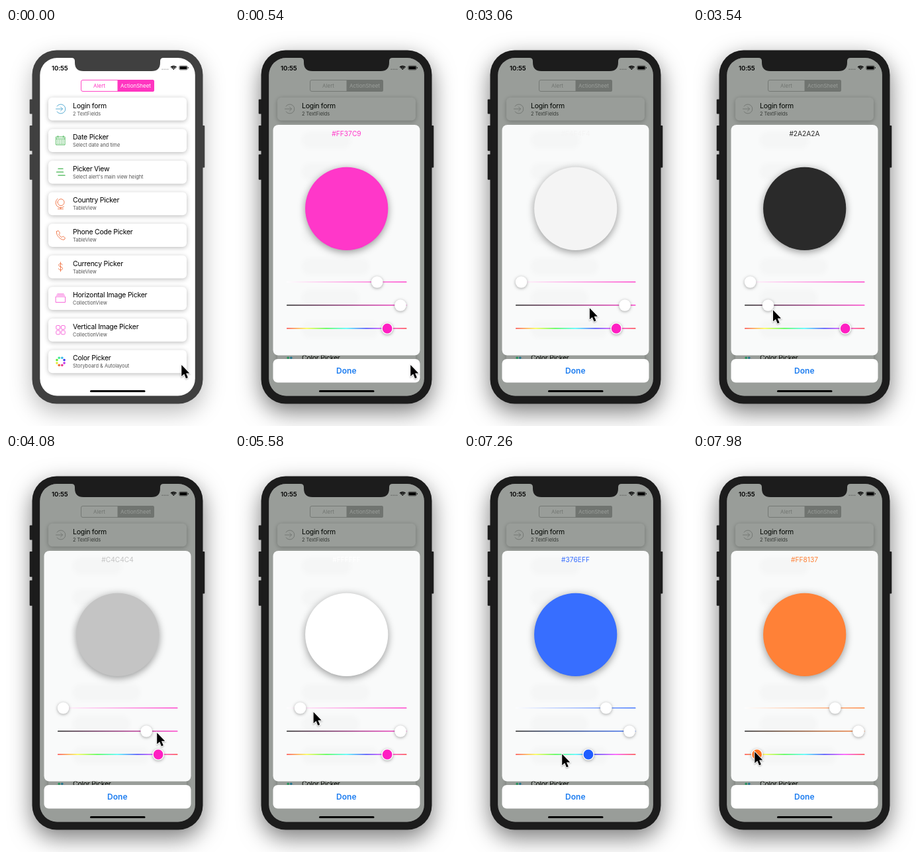
Write an HTML page with a canvas that moves like this. It is 337 px wide and 600 px high and loops after 8000 ms.

```html
<!DOCTYPE html>
<html lang="en">
<head>
<meta charset="utf-8">
<title>Color picker sheet</title>
<style>
  html, body { margin: 0; width: 100%; height: 100%; overflow: hidden; background: #fff; }
  canvas { display: block; width: 100vw; height: 100vh; }
</style>
</head>
<body>
<canvas></canvas>
<script>
const W = 337, H = 600, LOOP = 8000, TICK = 60;
const canvas = document.querySelector('canvas');
const ctx = canvas.getContext('2d');
const FONT = 'Inter, Roboto, sans-serif';
const PINK = '#ff35c0', BLUE = '#4aa5d0', GREEN = '#45b552', ORANGE = '#f07040', MAGENTA = '#f658d6';

// Moves: [start, end, ...destination], each easing on from the last position
const CURSOR = [
  [780, 1140, 223.5, 388],
  [1470, 2070, 51, 374],
  [2220, 2760, 265, 418],
  [2880, 3448, 106, 425],
  [3480, 4460, 254, 418],
  [4560, 5400, 88, 382],
  [5520, 5940, 222, 409],
  [6000, 6360, 222, 452],
  [6420, 6780, 231, 456],
  [6930, 7730, 92.5, 448]
];
const FULL = .7843, MAGENTA_HUE = .8785;
const SAT = [[1600, 2055, 0], [5550, 6050, FULL]];
const VAL = [[3044, 3540, .165], [3540, 4590, 1]];
const HUE = [[7075, 7980, .0617]];

const clamp = v => Math.max(0, Math.min(1, v));
const ease = (t, t0, t1) => Math.sin(clamp((t - t0) / (t1 - t0)) * Math.PI / 2);
const follow = (from, moves, t) => moves.reduce(
  (pos, [t0, t1, ...to]) => pos.map((p, i) => p + (to[i] - p) * ease(t, t0, t1)), from);

const rgb = c => `rgb(${c.map(Math.round).join(',')})`;
const hex = c => '#' + c.map(v => Math.round(v).toString(16).padStart(2, '0')).join('').toUpperCase();

function hsv(h, s, v) {
  return [5, 3, 1].map(n => {
    const k = (n + h * 6) % 6;
    return 255 * v * (1 - s * Math.max(0, Math.min(k, 4 - k, 1)));
  });
}
const vivid = h => hsv(h, .88, 1);

function shadow(alpha, blur, dy, paint) {
  const scale = ctx.getTransform().a;
  ctx.save();
  ctx.shadowColor = `rgba(0,0,0,${alpha})`;
  ctx.shadowBlur = blur * scale;
  ctx.shadowOffsetY = dy * scale;
  paint();
  ctx.restore();
}

function box(x, y, w, h, r, fill) {
  ctx.beginPath();
  ctx.roundRect(x, y, w, h, r);
  if (fill) { ctx.fillStyle = fill; ctx.fill(); }
}

function disc(x, y, r, fill) {
  ctx.beginPath();
  ctx.arc(x, y, r, 0, 7);
  ctx.fillStyle = fill;
  ctx.fill();
}

function text(str, x, y, size, fill, align = 'left', weight = 400, spacing = 0) {
  ctx.font = `${weight} ${size}px ${FONT}`;
  ctx.letterSpacing = spacing + 'px';
  ctx.textAlign = align;
  ctx.fillStyle = fill;
  ctx.fillText(str, x, y);
}

function line(color, path, width = .9) {
  ctx.strokeStyle = color;
  ctx.lineWidth = width;
  ctx.lineCap = ctx.lineJoin = 'round';
  ctx.stroke(new Path2D(path));
}

// Icons are drawn around their centre
const ICONS = {
  login(c) { line(c, 'M-5.5 -4A7 7 0 1 1 -5.5 4M-7 0H3M0 -3L3 0L0 3'); },
  calendar(c) {
    line(c, 'M-6.5 -5.5H6.5V6.5H-6.5ZM-6.5 -2.5H6.5M-4 -7V-4.5M4 -7V-4.5');
    for (let i = 0; i < 12; i++) {
      ctx.fillStyle = c;
      ctx.fillRect(-4.8 + i % 4 * 2.6, -.9 + Math.floor(i / 4) * 2.4, 1.4, 1.2);
    }
  },
  rows(c) { line(c, 'M-3.5 -5H3.5M-6 0H4M-3.5 5H6.5', 1.3); },
  globe(c) {
    line(c, 'M-4.5 -2A5 5 0 1 0 5.5 -2A5 5 0 1 0 -4.5 -2M-4.5 -7.5A7.3 7.3 0 0 0 5 4.5M0 5.5V8M-4 8H4');
  },
  phone(c) {
    line(c, 'M-6 -5.5L-3.5 -7L-1 -3.2L-2.7 -1.3C-1.5 1 0 2.3 1.8 3.2L3.6 1.5L7 4.2L5.5 6.7C1 8 -7.5 .5 -6 -5.5Z');
  },
  dollar(c) { line(c, 'M2.8 -3C2 -5.5 -3 -5.3 -2.8 -2.5C-2.6 .4 3 -.5 3 2.6C3 5.5 -2.5 5.6 -3 2.8M0 -7V7'); },
  stack(c) { line(c, 'M-7 -2.5H7V6H-7ZM-6 -4.7H6M-4.7 -6.7H4.7'); },
  grid(c) {
    ctx.strokeStyle = c;
    ctx.lineWidth = .9;
    for (const x of [-6.7, .9]) for (const y of [-6.7, .9]) { box(x, y, 5.8, 5.8, 1.5); ctx.stroke(); }
  },
  dots() {
    for (let i = 0; i < 8; i++) {
      const a = (i - 2.5) * Math.PI / 4;
      disc(6 * Math.cos(a), 6 * Math.sin(a), 1.8, rgb(hsv(.42 + i / 8, .75, .92)));
    }
  }
};

const ITEMS = [
  ['Login form', '2 TextFields', 'login', BLUE],
  ['Date Picker', 'Select date and time', 'calendar', GREEN],
  ['Picker View', "Select alert's main view height", 'rows', GREEN],
  ['Country Picker', 'TableView', 'globe', ORANGE],
  ['Phone Code Picker', 'TableView', 'phone', ORANGE],
  ['Currency Picker', 'TableView', 'dollar', ORANGE],
  ['Horizontal Image Picker', 'CollectionView', 'stack', MAGENTA],
  ['Vertical Image Picker', 'CollectionView', 'grid', MAGENTA],
  ['Color Picker', 'Storyboard & Autolayout', 'dots', '']
];

function drawPhone(body, depth) {
  shadow(depth, 34, 12, () => box(39.5, 33.5, 258, 533, 37, body));
  box(35.7, 107.5, 6, 22, 1, body);
  for (const y of [147, 190.5]) box(35.7, y, 6, 38.3, 1, body);
  box(295, 147, 5.3, 63.5, 1, body);
}

function drawList(dimmed) {
  const tint = c => dimmed ? '#bbb' : c;
  const pink = tint(PINK);
  box(168.5, 78, 55.5, 18, [0, 2.5, 2.5, 0], pink);
  box(113.5, 78.5, 110, 17, 2.5);
  ctx.strokeStyle = pink;
  ctx.lineWidth = .9;
  ctx.stroke();
  text('Alert', 141, 90, 8, pink, 'center');
  text('ActionSheet', 196, 90, 8, '#fff', 'center');

  ITEMS.forEach(([title, note, icon, color], i) => {
    const y = 104.7 + 47.6 * i;
    shadow(.27, 7, 1.5, () => box(64, y, 209, 34.8, 6, '#fff'));
    ctx.save();
    ctx.translate(82.5, y + 17.3);
    ICONS[icon](tint(color));
    ctx.restore();
    text(title, 101, y + 15.8, 10.5, '#000', 'left', 400, -.25);
    text(note, 101, y + 26.8, 7.4, '#555');
  });
}

function slider(y, pos, colorAt, thumb) {
  const steps = 12;
  const track = ctx.createLinearGradient(78, 0, 259, 0);
  for (let i = 0; i <= steps; i++) track.addColorStop(i / steps, rgb(colorAt(i / steps)));
  box(78, y - .7, 181.5, 1.3, .6, track);
  const x = 86.5 + 163.5 * pos;
  shadow(.35, 4, 1, () => disc(x, y, 8.8, '#fff'));
  if (thumb) disc(x, y, 7.4, thumb);
}

function drawSheet(t, drop) {
  const [s] = follow([FULL], SAT, t);
  const [v] = follow([1], VAL, t);
  const [h] = follow([MAGENTA_HUE], HUE, t);
  // The faintest tints show as plain grey
  const color = hsv(h, s < .08 ? 0 : s, v);
  const pure = vivid(h);
  ctx.save();
  ctx.translate(0, drop);
  box(57.5, 146, 222, 347.5, 8, '#f9fafa');

  // Faint traces of the rows behind the blurred sheet
  ctx.save();
  ctx.clip();
  ctx.filter = 'blur(3px)';
  for (let i = 0; i < 7; i++) box(101, 156 + 47.6 * i, 74 + i * 29 % 44, 26, 12, 'rgba(0,0,0,.014)');
  ctx.restore();

  text(hex(color), 168.5, 162.8, 10.2, rgb(color), 'center');
  shadow(.4, 12, 3, () => disc(168.7, 272.3, 62.6, rgb(color)));
  slider(383, s, k => pure.map(c => 255 + (c - 255) * k));
  slider(418, v, k => pure.map(c => c * k));
  slider(453, h, vivid, rgb(pure));

  box(57.5, 499, 222, 35.5, 7, '#fff');
  text('Done', 168.3, 521, 12, '#1b7cf0', 'center', 600);
  ctx.restore();
}

function drawStatus(body) {
  ctx.fillStyle = body;
  ctx.fill(new Path2D('M99 44V45Q104 45 104 50V52Q104 65 117 65H220Q233 65 233 52V50Q233 45 238 45V44Z'));
  text('10:55', 81.3, 63.6, 9.6, '#000', 'center', 600, -.1);
  for (let i = 0; i < 4; i++) disc(236.2 + i * 2.8, 62.3, .8, 'rgba(0,0,0,.4)');
  ctx.strokeStyle = '#000';
  ctx.lineWidth = 1.5;
  ctx.lineCap = 'butt';
  for (let r = 1.4; r < 6; r += 2.2) {
    ctx.beginPath();
    ctx.arc(253.3, 63.2, r, -Math.PI * .76, -Math.PI * .24);
    ctx.stroke();
  }
  box(261.8, 57, 12.4, 6, 1.6);
  ctx.lineWidth = .5;
  ctx.stroke();
  box(262.6, 57.8, 10.8, 4.4, .8, '#000');
  box(274.8, 59, .9, 2, .4, '#000');
  box(127, 546, 83.5, 3, 1.5, '#000');
}

function drawCursor(t) {
  const arrow = new Path2D('M0 0V17L4 13.6L6.7 20.2L9.6 19L6.8 12.5H12Z');
  const [x, y] = follow([264.5, 507], CURSOR, t);
  ctx.save();
  ctx.translate(x + .8, y + 1);
  ctx.fillStyle = '#000';
  ctx.strokeStyle = '#fff';
  ctx.lineWidth = 1.8;
  ctx.lineJoin = 'miter';
  shadow(.3, 2, 1, () => ctx.stroke(arrow));
  ctx.fill(arrow);
  ctx.restore();
}

function draw(now) {
  const t = Math.floor(now % LOOP / TICK) * TICK;
  const ratio = window.devicePixelRatio || 1;
  const pw = Math.round(innerWidth * ratio), ph = Math.round(innerHeight * ratio);
  if (canvas.width !== pw || canvas.height !== ph) { canvas.width = pw; canvas.height = ph; }
  ctx.setTransform(pw / W, 0, 0, ph / H, 0, 0);
  ctx.fillStyle = '#fff';
  ctx.fillRect(0, 0, W, H);

  const faded = t < TICK;
  const body = faded ? '#404040' : '#1c1c1c';
  const shown = ease(t, 240, 540);
  drawPhone(body, faded ? .27 : .52);
  ctx.save();
  box(51.3, 45, 234.5, 509.5, 26, '#fff');
  ctx.clip();
  drawList(shown > 0);
  if (shown) {
    ctx.fillStyle = `rgba(0,12,0,${.4 * shown})`;
    ctx.fillRect(50, 44, 238, 512);
    drawSheet(t, 410 * (1 - shown));
  }
  drawStatus(body);
  ctx.restore();
  drawCursor(t);
}

const start = performance.now();
function loop() {
  draw(performance.now() - start);
  requestAnimationFrame(loop);
}
loop();
</script>
</body>
</html>
```
